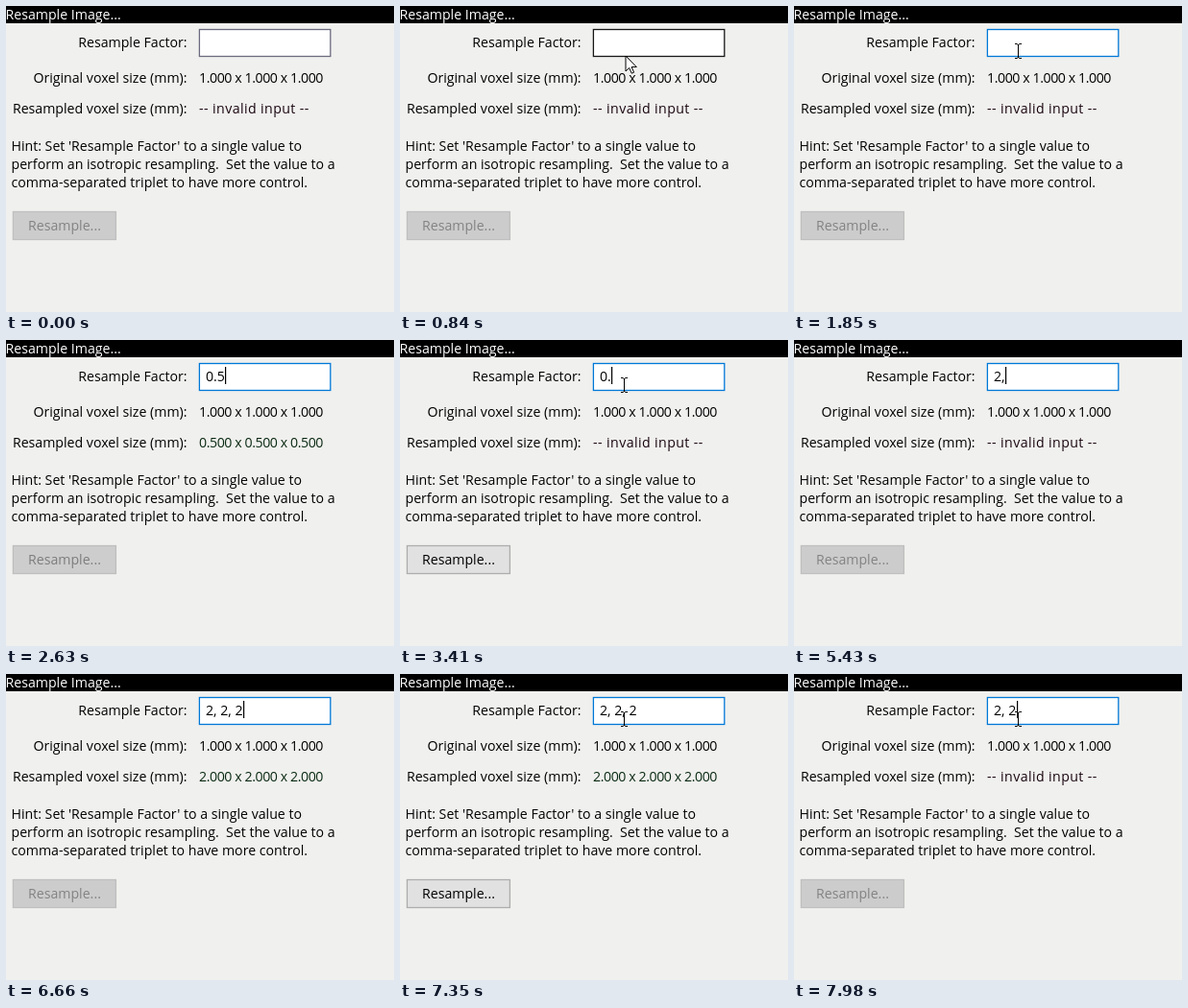
Recreate the animation shown at these times as an HTML page. Size 404x319 px, loop 8 s.

```html
<!DOCTYPE html>
<html lang="en">
<head>
<meta charset="utf-8">
<title>Resample Image</title>
<style>
  html, body { margin: 0; width: 100%; height: 100%; overflow: hidden; background: #f0f0ee; }
  svg { display: block; width: 404px; height: 319px; }
  text { font: 14.15px 'Open Sans', 'Noto Sans', sans-serif; white-space: pre; }
  .label { text-anchor: end; }
  .box { stroke-width: 1.3; }
</style>
</head>
<body>
<svg viewBox="0 0 404 319">
  <rect width="404" height="319" fill="#f0f0ee"/>
  <rect width="404" height="18" fill="#000"/>
  <text x="-0.5" y="14" fill="#fff">Resample Image...</text>

  <text class="label" x="188.5" y="43">Resample Factor:</text>
  <text class="label" x="188.5" y="80">Original voxel size (mm):</text>
  <text class="label" x="188.5" y="112">Resampled voxel size (mm):</text>
  <text x="201" y="80" letter-spacing="-0.42">1.000 x 1.000 x 1.000</text>
  <text id="result" x="201" y="112"></text>

  <text x="5.5" y="151">Hint: Set 'Resample Factor' to a single value to</text>
  <text x="5.5" y="170">perform an isotropic resampling.  Set the value to a</text>
  <text x="5.5" y="189">comma-separated triplet to have more control.</text>

  <rect id="field" class="box" x="201.4" y="24.5" width="136.4" height="28" fill="#fff"/>
  <text id="value" x="208" y="43"></text>
  <rect id="caret" y="28" width="1.2" height="18"/>

  <rect id="button" class="box" x="7.4" y="214.5" width="107" height="29"/>
  <text id="caption" x="23" y="234">Resample...</text>

  <path id="arrow" d="M0 0V16L3.7 12.5L6.2 18.2L8.6 17.2L6.1 11.6H11.3Z" fill="#fff" stroke="#000"/>
  <path id="beam" d="M-3 -7.5H-1L.5 -6.5L2 -7.5H4M.5 -7V7M-3 7.5H-1L.5 6.5L2 7.5H4" fill="none" stroke="#000"/>
</svg>
<script>
const LOOP = 8000, STEP = 77, BLINK = 530;
const HOVER = 840, CLICK = 1300;

// [time, field content]
const edits = [
  [CLICK, ''], [2170, '0'], [2400, '0.'], [2550, '0.5'],
  [3410, '0.'], [3560, '0'], [3710, ''],
  [4190, '2'], [5350, '2,'], [5500, '2, '], [5730, '2, 2'],
  [6040, '2, 2,'], [6120, '2, 2, '], [6350, '2, 2, 2'],
  [7500, '2, 2, '], [7730, '2, 2,'], [7980, '2, 2']
];
// [start, end, enabled]
const fades = [
  [2620, 2860, 1], [3415, 3560, 0], [4270, 4570, 1],
  [5350, 5425, 0], [6670, 6810, 1], [7510, 7810, 0]
];
// pointer is hidden while typing
const shown = [[70, 2400], [3010, 3560], [5120, 5350], [5960, 6040], [7120, LOOP]];

const el = Object.fromEntries([...document.querySelectorAll('[id]')].map(n => [n.id, n]));
const set = (node, attrs) => {
  for (const k in attrs) node.setAttribute(k, attrs[k]);
};
const clamp = v => Math.min(1, Math.max(0, v));
const mix = (a, b, k) => a + (b - a) * k;
const grey = v => `rgb(${v},${v},${v})`;
const show = (node, on) => set(node, { visibility: on ? 'visible' : 'hidden' });

function voxels(value) {
  const parts = value.split(',').map(s => s.trim());
  const ok = parts.every(s => /^\d+(\.\d+)?$/.test(s) && +s > 0);
  if (!ok || parts.length !== 1 && parts.length !== 3) return null;
  return [0, 1, 2].map(i => (+parts[i % parts.length]).toFixed(3)).join(' x ');
}

function drawField(t) {
  let [since, value] = [Infinity, ''];
  for (const e of edits) if (t >= e[0]) [since, value] = e;
  el.value.textContent = value;
  const width = value ? el.value.getComputedTextLength() : 0;
  set(el.caret, { x: Math.round(208.4 + width) });
  show(el.caret, t >= CLICK && (t - since) % (2 * BLINK) < BLINK);
  set(el.field, { stroke: t >= CLICK ? '#0078d7' : t >= HOVER ? '#171717' : '#6b6b80' });

  const size = voxels(value);
  el.result.textContent = size || '-- invalid input --';
  set(el.result, {
    fill: size ? '#0a2a12' : '#1a0610',
    'letter-spacing': size ? -0.42 : 0.42
  });
}

function drawButton(t) {
  let k = 0;
  for (const [from, to, on] of fades) {
    if (t >= from) k = mix(1 - on, on, clamp((t - from) / (to - from)));
  }
  set(el.button, { fill: grey(mix(204, 225, k)), stroke: grey(mix(191, 173, k)) });
  set(el.caption, { fill: grey(mix(131, 0, k)) });
}

// The pointer rises from the lower right and curves into the field.
function drawPointer(t) {
  const at = 70 + Math.floor((t - 70) / STEP) * STEP;
  const k = clamp((at - 70) / 1000);
  const ease = 1 - (1 - k) ** 2.5;
  const x = Math.round(mix(308, 233, ease ** 1.3));
  const y = Math.round(mix(256, 47, ease));
  const on = shown.some(([a, b]) => t >= a && t < b);
  const inside = y < 52;
  show(el.arrow, on && !inside);
  show(el.beam, on && inside);
  set(inside ? el.beam : el.arrow, { transform: `translate(${x} ${y})` });
}

function draw(now) {
  const t = now % LOOP;
  drawField(t);
  drawButton(t);
  drawPointer(t);
}

const start = performance.now();
function tick() {
  draw(performance.now() - start);
  requestAnimationFrame(tick);
}
tick();
</script>
</body>
</html>
```
